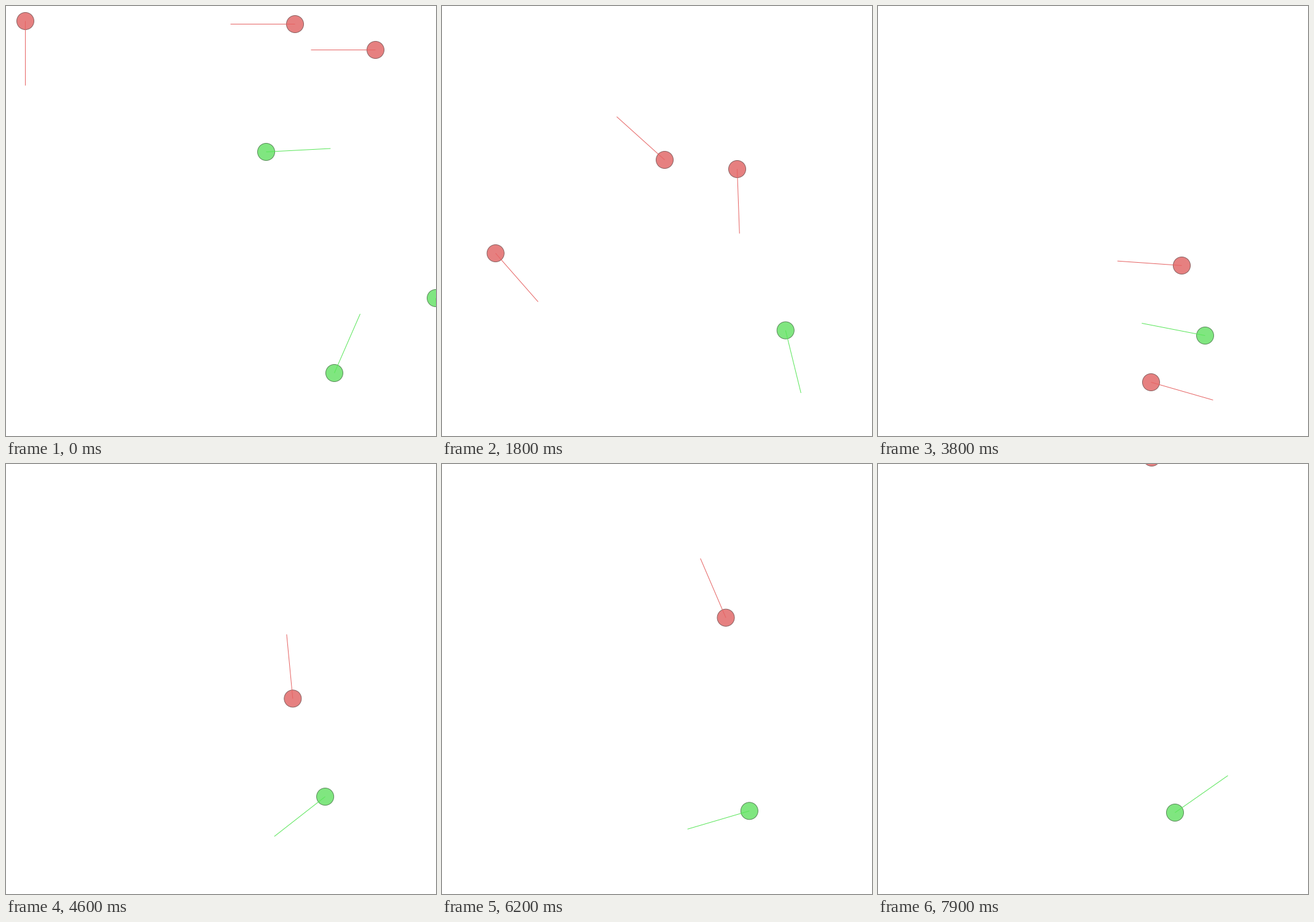
Animation of 700 by 700 pixels, one loop 8 s. Source, as a matplotlib script:

```python
import numpy as np
import matplotlib.pyplot as plt
from matplotlib.animation import FuncAnimation
from matplotlib.patches import Circle

SIZE, DPI = 700, 100
FRAMES, INTERVAL = 80, 100
RADIUS, FEELER = 14, 105
PIXEL = 72 / DPI

# fill, outline, feeler
RED = ("#e68080", "#8c6464", "#e66464")
GREEN = ("#80e680", "#5c8c5c", "#5ae65a")

# Key poses: frame, x, y, heading in degrees (clockwise from right).
# A creature is gone after its last pose.
CREATURES = [
    (RED, [(0, 31, 24, 90), (11, 31, 272, 90), (26, 229, 491, 13),
           (38, 444, 612, 16), (45, 540, 718, 70)]),
    (RED, [(0, 601, 71, 180), (11, 444, 222, 131), (18, 362, 250, 222),
           (26, 385, 119, 268), (34, 380, -30, 268)]),
    (RED, [(0, 470, 29, 180), (11, 480, 188, 93), (26, 483, 353, 89.5),
           (38, 494, 422, 184), (54, 473, 317, 286.5), (70, 442, 181, 273),
           (79, 445, -11, 271)]),
    (GREEN, [(0, 423, 237, -3), (11, 473, 225, -23)]),
    (GREEN, [(0, 534, 597, -66.4), (11, 555, 521, -63.4), (26, 566, 540, -13),
             (38, 532, 536, 191), (54, 516, 549, 22), (70, 453, 568, 199),
             (79, 483, 567, -35)]),
    (GREEN, [(0, 699, 475, 86), (11, 699, 650, 90), (16, 699, 731, 90)]),
]


def unit(degrees):
    angle = np.radians(degrees)
    return np.array([np.cos(angle), np.sin(angle)])


def steer(frame, poses):
    """Position and direction of travel on a curve that leaves and meets
    each pose along its heading, at the average pace of the stretch."""
    start, end = next((a, b) for a, b in zip(poses, poses[1:]) if frame <= b[0])
    u = (frame - start[0]) / (end[0] - start[0])
    origin = np.array(start[1:3])
    step = np.array(end[1:3]) - origin
    leave, meet = (np.hypot(*step) * unit(pose[3]) for pose in (start, end))
    position = (origin + u * u * (3 - 2 * u) * step
                + u * (1 - u) ** 2 * leave - u * u * (1 - u) * meet)
    velocity = (6 * u * (1 - u) * step
                + (1 - u) * (1 - 3 * u) * leave + u * (3 * u - 2) * meet)
    return position, velocity / np.hypot(*velocity)


class Creature:
    def __init__(self, ax, colors, poses):
        fill, outline, feeler = colors
        self.poses = poses
        self.body = ax.add_patch(Circle((0, 0), RADIUS, fc=fill, ec=outline,
                                        lw=PIXEL, zorder=1))
        self.feeler, = ax.plot([], [], color=feeler, lw=PIXEL, zorder=2,
                               snap=False, solid_capstyle="butt")

    def update(self, frame):
        alive = frame <= self.poses[-1][0]
        self.body.set_visible(alive)
        self.feeler.set_visible(alive)
        if alive:
            position, direction = steer(frame, self.poses)
            self.body.center = position
            self.feeler.set_data(*zip(position, position + FEELER * direction))


fig = plt.figure(figsize=(SIZE / DPI, SIZE / DPI), dpi=DPI, facecolor="white")
ax = fig.add_axes([0, 0, 1, 1])
ax.set_axis_off()
creatures = [Creature(ax, colors, poses) for colors, poses in CREATURES]
# Whole coordinates fall on pixel centres
ax.set(xlim=(-0.5, SIZE - 0.5), ylim=(SIZE - 0.5, -0.5))


def draw(frame):
    for creature in creatures:
        creature.update(frame)
    return []


animation = FuncAnimation(fig, draw, frames=FRAMES, interval=INTERVAL,
                          init_func=lambda: draw(0), repeat=True, repeat_delay=0)
plt.show()
```
